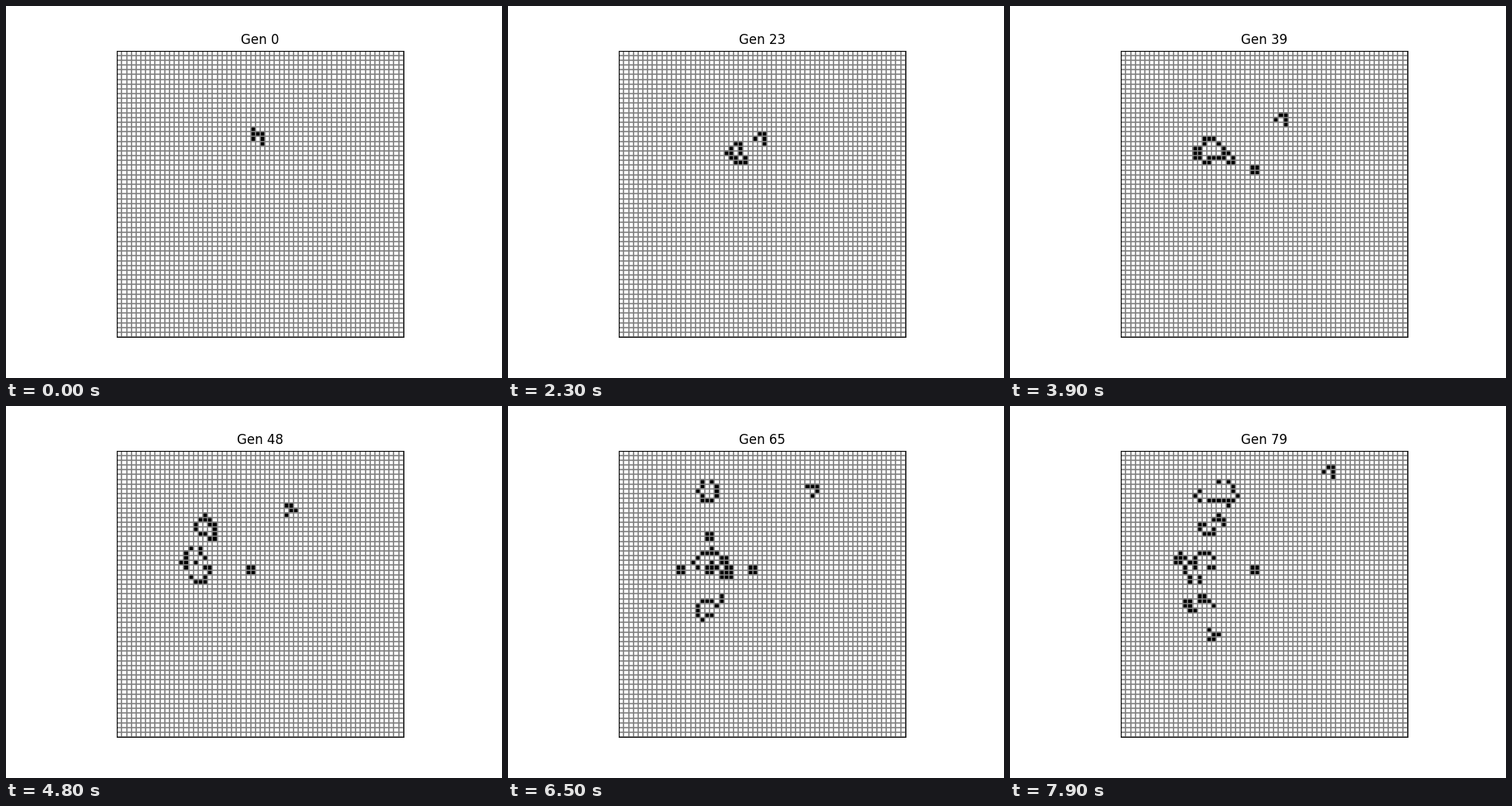
These frames come from a looping animation (640 by 480 pixels, 8 s). A matplotlib script:

```python
import numpy as np
import matplotlib.pyplot as plt
from matplotlib.animation import FuncAnimation

SIZE = 60
GENERATIONS = 80
HERSCHEL = ["O..", "OOO", "O.O", "..O"]
TOP, LEFT = 16, 28


def step(grid):
    """Advance the Game of Life by one generation on a torus."""
    neighbours = sum(
        np.roll(grid, (dy, dx), axis=(0, 1))
        for dy in (-1, 0, 1)
        for dx in (-1, 0, 1)
        if (dy, dx) != (0, 0)
    )
    return ((neighbours == 3) | ((grid == 1) & (neighbours == 2))).astype(int)


def evolve():
    grid = np.zeros((SIZE, SIZE), dtype=int)
    for y, row in enumerate(HERSCHEL):
        for x, cell in enumerate(row):
            grid[TOP + y, LEFT + x] = cell == "O"
    history = [grid]
    while len(history) < GENERATIONS:
        history.append(step(history[-1]))
    return history


history = evolve()

fig, ax = plt.subplots(figsize=(6.4, 4.8), dpi=100)
image = ax.imshow(history[0], cmap="binary", vmin=0, vmax=1,
                  interpolation="nearest")
title = ax.set_title("Gen 0")

# Cell borders are drawn as a minor grid without tick marks.
borders = np.arange(-0.5, SIZE)
ax.set_xticks([])
ax.set_yticks([])
ax.set_xticks(borders, minor=True)
ax.set_yticks(borders, minor=True)
ax.tick_params(which="minor", length=0)
ax.grid(which="minor", color="gray", linestyle="-", linewidth=1.2)


def update(gen):
    image.set_data(history[gen])
    title.set_text(f"Gen {gen}")
    return image, title


anim = FuncAnimation(fig, update, frames=GENERATIONS, interval=100,
                     repeat=True, repeat_delay=0, blit=False)
plt.show()
```
